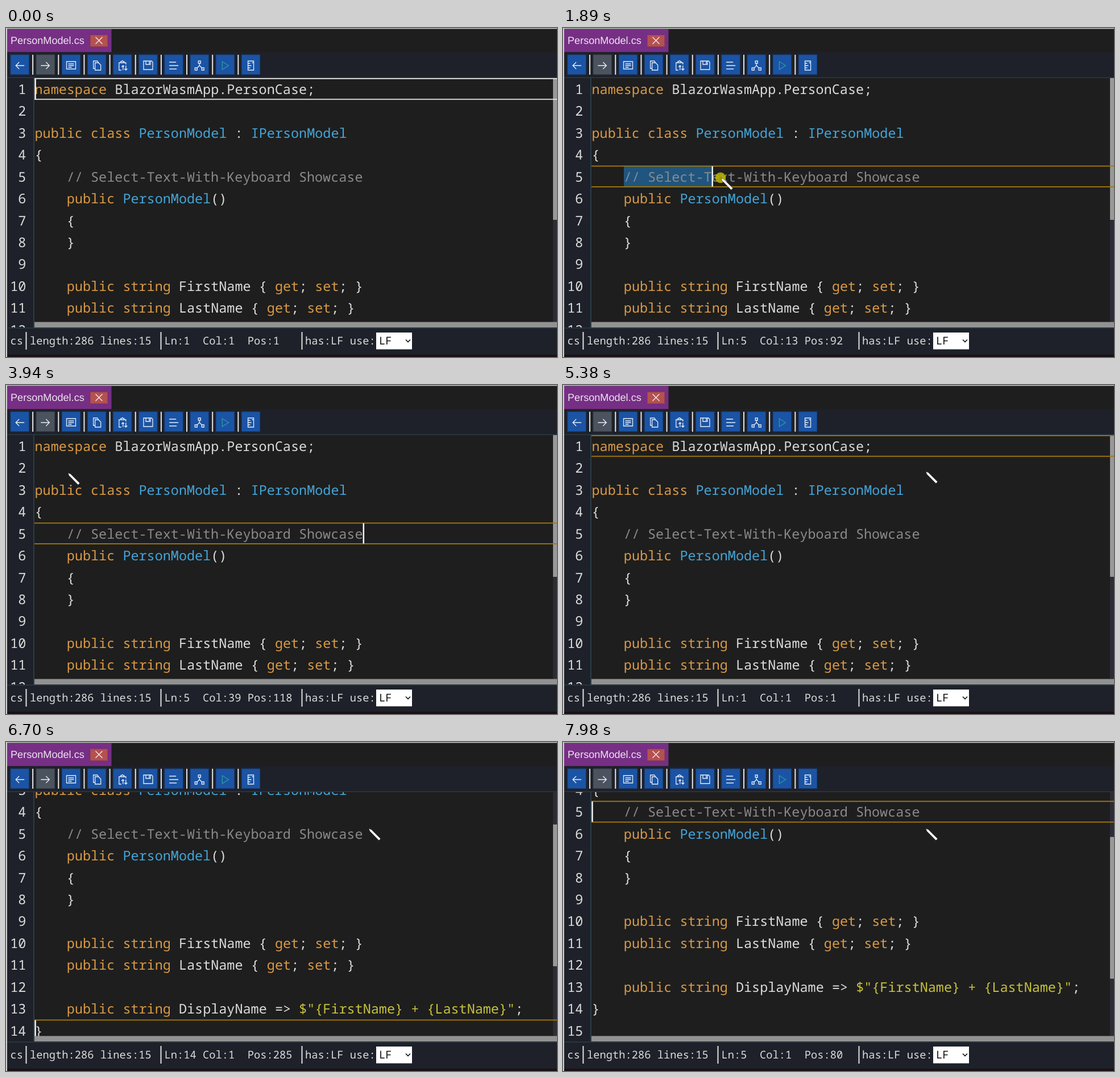
An HTML page that plays this animation: 969 px wide and 578 px high, repeating every 8000 ms.

```html
<!DOCTYPE html>
<html lang="en">
<head>
<meta charset="utf-8">
<title>Editor: select text</title>
<style>
html, body { margin: 0; width: 100%; height: 100%; overflow: hidden; background: #1e1e1e; }
svg { display: block; }
text { white-space: pre; text-rendering: geometricPrecision; fill: #dcdcdc; }
.code text { font: 23.467px "Noto Sans Mono", "DejaVu Sans Mono", monospace; }
.status text { font: 18.75px "Noto Sans Mono", "DejaVu Sans Mono", monospace; }
.tab { font: 18.1px "Liberation Sans", Arial, sans-serif; fill: #ece4ee; }
.code .key { fill: #da9a45; }
.code .type { fill: #43a5d8; }
.code .note { fill: #8a8a8a; }
.code .str { fill: #c6c23c; }
.code .num { text-anchor: end; }
.icons path { fill: none; stroke: #e8eef6; stroke-width: 1.3; }
</style>
</head>
<body>
<svg width="969" height="578" viewBox="0 0 969 578">
  <defs>
    <clipPath id="view"><rect x="0" y="88" width="969" height="438.5"/></clipPath>
  </defs>
  <rect width="969" height="578" fill="#1e1e1e"/>
  <rect x="2" y="87" width="47" height="440" fill="#1e2129"/>
  <rect x="48" y="88" width="2" height="439" fill="#2a3d49"/>

  <g class="code" clip-path="url(#view)">
    <rect x="962" y="88" width="7" height="438" fill="#2e2d35"/>
    <rect id="thumb" x="962" y="88" width="7" height="249" fill="#989898"/>
    <g id="page">
      <rect id="sel" x="107" y="243" height="35.5" fill="#1f557f"/>
      <g id="lines"></g>
      <g id="row">
        <rect x="50" width="919" height="1.8"/>
        <rect x="50" y="36.4" width="919" height="1.8"/>
      </g>
      <rect id="caret" width="2.5" height="35.5" fill="#f4f4f4"/>
    </g>
    <rect x="50" y="516.5" width="919" height="10" fill="#929292"/>
  </g>

  <rect x="2" y="2" width="183.5" height="40.5" fill="#762f84"/>
  <text class="tab" x="8" y="28">PersonModel.cs</text>
  <rect x="148.5" y="12.5" width="30" height="20" fill="#b5514f" stroke="#93434f"/>
  <path d="M157.5 16l12 12m0-12l-12 12" stroke="#f2e8ea" stroke-width="1.4"/>

  <rect x="2" y="42.5" width="967" height="44.5" fill="#1e2129"/>
  <rect x="2" y="86.5" width="967" height="1.5" fill="#2a3a44"/>
  <g class="icons" id="tools"></g>

  <g class="status">
    <rect x="2" y="526.5" width="967" height="48" fill="#1e2129"/>
    <rect x="2" y="526.5" width="967" height="1.2" fill="#2f424d"/>
    <rect x="0" y="574" width="969" height="4" fill="#1b1014"/>
    <path d="M35.5 534v31M272.5 534v31M520.5 534v31" stroke="#e2e2e2" stroke-width="2"/>
    <text x="7.5" y="556">cs</text>
    <text x="42" y="556">length:286 lines:15</text>
    <text id="pos" x="278.5" y="556"></text>
    <text x="526" y="556">has:LF use:</text>
    <rect x="651" y="535" width="63" height="29.5" fill="#fff"/>
    <text x="656" y="556" style="fill:#111">LF</text>
    <path d="M703 547.5l4 4 4-4" fill="none" stroke="#111" stroke-width="1.6"/>
  </g>
  <rect width="969" height="1.5" fill="#c4c4c4"/>
  <rect width="2" height="578" fill="#cfcfcf"/>

  <g id="pointer">
    <circle id="press" cx="-1" cy="-.5" r="9.3" fill="#b9b400" fill-opacity=".87"/>
    <path d="M0 0L4.5 1.8 20.8 18 17.8 21 1.8 4.8Z" fill="#fff" stroke="#111" stroke-width=".5"/>
  </g>
</svg>
<script>
const LOOP = 8000, LEFT = 51, CHAR = 14.08, TOP = 88, ROW = 38.42, INDENT = 107, SLACK = 12;
const $ = id => document.getElementById(id);

const lines = [
  'namespace BlazorWasmApp.PersonCase;',
  '',
  'public class PersonModel : IPersonModel',
  '{',
  '\t// Select-Text-With-Keyboard Showcase',
  '\tpublic PersonModel()',
  '\t{',
  '\t}',
  '',
  '\tpublic string FirstName { get; set; }',
  '\tpublic string LastName { get; set; }',
  '',
  '\tpublic string DisplayName => $"{FirstName} + {LastName}";',
  '}',
  ''
];
// Position of the first character of each line, counted from 1
const starts = lines.map((_, i) => lines.slice(0, i).join('\n').length + (i ? 2 : 1));

const token = /(?<note>\/\/.*)|(?<str>\$".*")|(?<key>\b(?:namespace|public|class|string|get|set)\b)|(?<type>\bI?PersonModel\b)|\w[\w.]*|[^\s\w]+/g;
const esc = s => s.replace(/&/g, '&amp;').replace(/</g, '&lt;');

$('lines').innerHTML = lines.map((line, i) => {
  const y = TOP + ROW * i + 28;
  const words = [...line.replace('\t', '    ').matchAll(token)].map(m => {
    const kind = Object.keys(m.groups).find(k => m.groups[k]) || '';
    return `<text class="${kind}" x="${LEFT - .5 + m.index * CHAR}" y="${y}">${esc(m[0])}</text>`;
  });
  return `<text class="num" x="35.4" y="${y}">${i + 1}</text>` + words.join('');
}).join('');

const icons = [
  'M8 0H-7M-1-6L-7 0-1 6',
  'M-8 0H7M1-6L7 0 1 6',
  'M-8-7H8V6H-8ZM-5-3H5M-5 0H5M-5 3H1',
  'M-3-5H3L7-1V8H-3ZM-3 5H-6V-8H1L3-5',
  'M-2 8H-6V-5H6V-2M-3-5V-7H-1.5Q0-10 1.5-7H3V-5M1 8V0M-1.5 2.5L1 0 3 2M6 0V8M3.5 5.5L6 8 8.5 5.5',
  'M-8-8H6L8-6V7H-8ZM-4-8V-2H4V-8M2-7V-3',
  'M-8-6H4M-8 0H8M-8 6H5',
  'M-2-8H2V-4H-2ZM0-4V0L-5 5M0 0L5 5M-8 4H-4V8H-8ZM4 4H8V8H4Z',
  'M-5-7L6 0-5 7Z',
  'M-5-8H5V8H-5ZM-5-4H-1M-5 0H1M-5 4H-1M2-5H5'
];
$('tools').innerHTML = icons.map((d, i) => {
  const x = 8 + 45.15 * i;
  const fill = i === 1 ? '#4b535f' : '#1b54a5';
  const edge = i === 1 ? '#3a414c' : '#173f7c';
  const bar = i ? `<rect x="${x - 7}" y="47" width="2" height="35" fill="#e6e6e6"/>` : '';
  const tint = i === 8 ? ' style="stroke:#2b9aa0"' : '';
  return `${bar}<rect x="${x}" y="47" width="32.3" height="34.7" fill="${fill}" stroke="${edge}"/>` +
    `<path transform="translate(${x + 16.2} 66)" d="${d}"${tint}/>`;
}).join('');

const within = (t, a, b) => t >= a - 5 && t < b - 5;
const mix = (a, b, u) => a + (b - a) * u;
const out = (u, n) => 1 - (1 - u) ** n;
const smooth = u => u * u * (3 - 2 * u);

// Index of the current step, of n steps from a to b
const stepAt = (t, a, b, n) =>
  Math.max(0, Math.min(n - 1, Math.floor((t - a + SLACK) * (n - 1) / (b - a))));

function pointerAt(t) {
  if (t < 985) {
    const u = stepAt(t, 170, 920, 12) / 11;
    return [mix(873, 119, out(u, 2)), mix(527, 267, out(u, 1.7))];
  }
  if (t < 1405) {
    const u = (stepAt(t, 990, 1200, 4) + 1) / 4;
    return [mix(119, 108, u), mix(267, 263.5, u)];
  }
  if (t < 2235) {
    const k = stepAt(t, 1410, 2170, 12);
    return [k < 7 ? mix(108, 278, k / 7) : mix(278, 356, (k - 7) / 4), 263.5];
  }
  if (t < 3115) return [mix(382, 643, stepAt(t, 2240, 2970, 12) / 11), 263.5];
  if (t < 3535) return [647.5, 264];
  if (t < 4365) {
    const u = stepAt(t, 3540, 4290, 12) / 11;
    return [mix(647.5, 39.5, out(u, 2.75)), mix(264, 112, out(u, 1.62))];
  }
  const u = smooth(Math.max(0, stepAt(t, 4370, 5110, 12) - 1) / 10);
  return [mix(39.5, 638, u), mix(112, 152, u)];
}

// Characters selected so far; the end of the drag keeps its value
function draggedAt(t) {
  const [x] = pointerAt(Math.min(t, 2970));
  return Math.max(0, Math.min(37, Math.floor((x - INDENT) / CHAR - .5)));
}

function lineAt(t) {
  if (t < 1405) return 1;
  if (t < 4365) return 5;
  if (t < 5855) return 1;
  if (t < 6365) return 2;
  if (t < 7235) return [3, 5, 8, 10, 12, 14, 15, 15][stepAt(t, 6370, 6840, 8)];
  if (t < 7695) return 14;
  return 13 - 2 * stepAt(t, 7700, 7980, 5);
}

function draw(t) {
  const [px, py] = pointerAt(t);
  const line = lineAt(t);
  const dragging = within(t, 1410, 4370);
  const chars = dragging ? draggedAt(t) : 0;
  const col = dragging ? chars + 2 : 1;
  const cell = dragging ? chars + 4 : 0;
  const deepest = t < 7235 ? line : 15;
  const scroll = Math.max(0, TOP + ROW * deepest - 526);
  const y = TOP + ROW * (line - 1);

  $('page').setAttribute('transform', `translate(0 ${-scroll})`);
  $('thumb').setAttribute('y', TOP + scroll * .57);
  $('row').setAttribute('transform', `translate(0 ${y})`);
  $('row').setAttribute('fill', t < 1405 ? '#e4e4e4' : '#a67a0c');
  $('sel').setAttribute('width', within(t, 1410, 3260) ? chars * CHAR : 0);

  const dark = within(t, 170, 1200) || within(t, 4290, 4370) || within(t, 5380, 5860);
  $('caret').setAttribute('visibility', dark ? 'hidden' : 'visible');
  $('caret').setAttribute('x', LEFT - .7 + cell * CHAR);
  $('caret').setAttribute('y', y + 1.3);

  $('pos').textContent = `Ln:${line}`.padEnd(6) + `Col:${col}`.padEnd(7) +
    `Pos:${starts[line - 1] + col - 1}`;

  const pressed = within(t, 1410, 3120) || within(t, 3260, 3330) || within(t, 4370, 4500);
  $('press').setAttribute('opacity', pressed ? 1 : 0);
  $('pointer').setAttribute('visibility', t < 165 ? 'hidden' : 'visible');
  $('pointer').setAttribute('transform', `translate(${px} ${py})`);
}

function tick() {
  draw(performance.now() % LOOP);
  requestAnimationFrame(tick);
}
tick();
</script>
</body>
</html>
```
